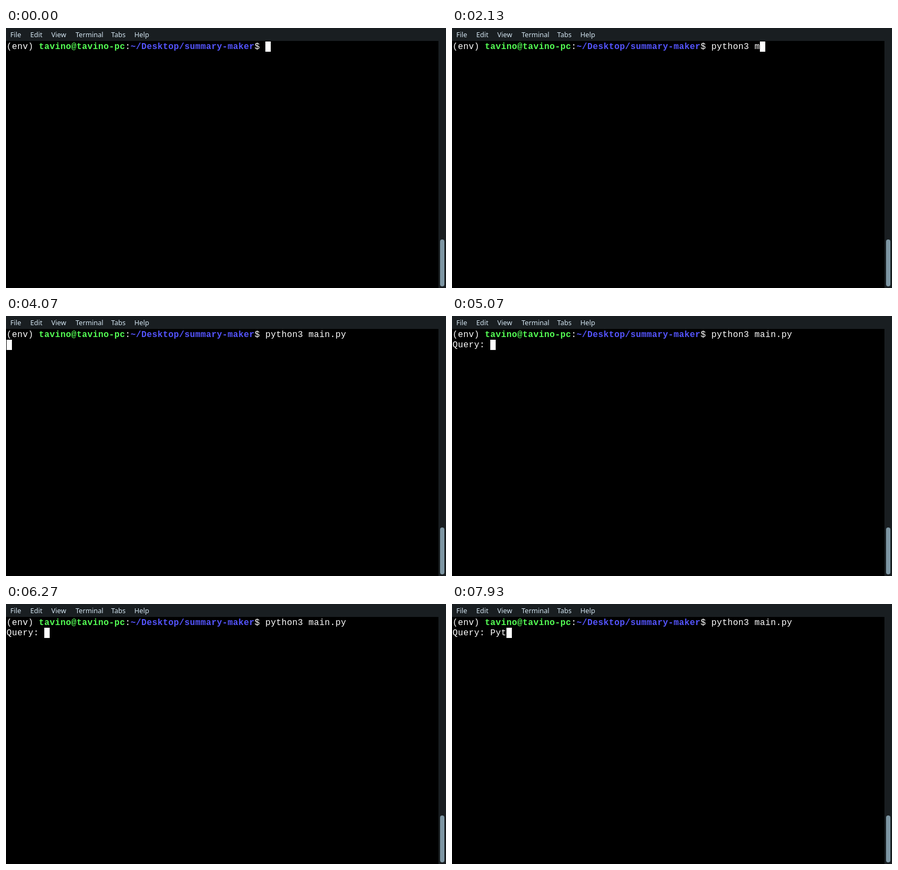
An HTML page with a canvas that plays this animation: 816 px wide and 482 px high, repeating every 8 s.

```html
<!DOCTYPE html>
<html lang="en">
<head>
<meta charset="utf-8">
<title>Terminal</title>
<style>
html, body { margin: 0; width: 100%; height: 100%; overflow: hidden; background: #000; }
canvas { display: block; width: 816px; height: 482px; }
</style>
</head>
<body>
<canvas id="stage" width="816" height="482"></canvas>
<script>
const ctx = document.getElementById("stage").getContext("2d");
const LOOP = 8000;
const CELL = 10, ROW = 19, LEFT = 1, TOP = 25;
const MONO = '16px "Liberation Mono", monospace';

const MENU = [["File", 8], ["Edit", 45], ["View", 84], ["Terminal", 129], ["Tabs", 195], ["Help", 238]];
const PROMPT = [
  ["(env) ", "#fff"],
  ["tavino@tavino-pc", "#55ff55", true],
  [":", "#fff"],
  ["~/Desktop/summary-maker", "#5555ff", true],
  ["$ ", "#fff"]
];

// Times in ms at which each key lands
const COMMAND = "python3 main.py";
const COMMAND_KEYS = [270, 470, 600, 730, 930, 1070, 1470, 1800, 2070, 2270, 2470, 2670, 2930, 3270, 3470];
const ENTER = 3800, ASK = 4670;
const QUERY = "Pyt";
const QUERY_KEYS = [7270, 7530, 7800];

const typed = (text, keys, t) => text.slice(0, keys.filter(k => k <= t).length);

// Draws text on the character grid and returns the next column
function write(text, col, row, color = "#fff", bold = false) {
  ctx.font = (bold ? "bold " : "") + MONO;
  ctx.fillStyle = color;
  for (const ch of text) ctx.fillText(ch, LEFT + CELL * col++, TOP + ROW * row + 14);
  return col;
}

function drawWindow() {
  ctx.fillStyle = "#000";
  ctx.fillRect(0, 0, 816, 482);
  ctx.fillStyle = "#191e21";
  ctx.fillRect(0, 0, 816, 24);
  ctx.fillRect(802, 24, 14, 458);

  ctx.fillStyle = "#7d96a3";
  ctx.beginPath();
  ctx.roundRect(805, 392, 8, 87, 4);
  ctx.fill();

  ctx.font = '12.6px "Noto Sans", sans-serif';
  ctx.fillStyle = "#d4e6f2";
  for (const [label, x] of MENU) ctx.fillText(label, x, 17);
}

function draw(t) {
  drawWindow();
  let col = 0, row = 0;
  for (const [text, color, bold] of PROMPT) col = write(text, col, 0, color, bold);
  col = write(typed(COMMAND, COMMAND_KEYS, t), col, 0);

  if (t >= ENTER) {
    row = 1;
    col = t >= ASK ? write("Query: " + typed(QUERY, QUERY_KEYS, t), 0, 1) : 0;
  }
  ctx.fillStyle = "#fff";
  ctx.fillRect(LEFT + CELL * col, TOP + ROW * row, CELL, ROW);
}

const start = performance.now();
function tick() {
  draw((performance.now() - start) % LOOP);
  requestAnimationFrame(tick);
}
tick();
</script>
</body>
</html>
```
